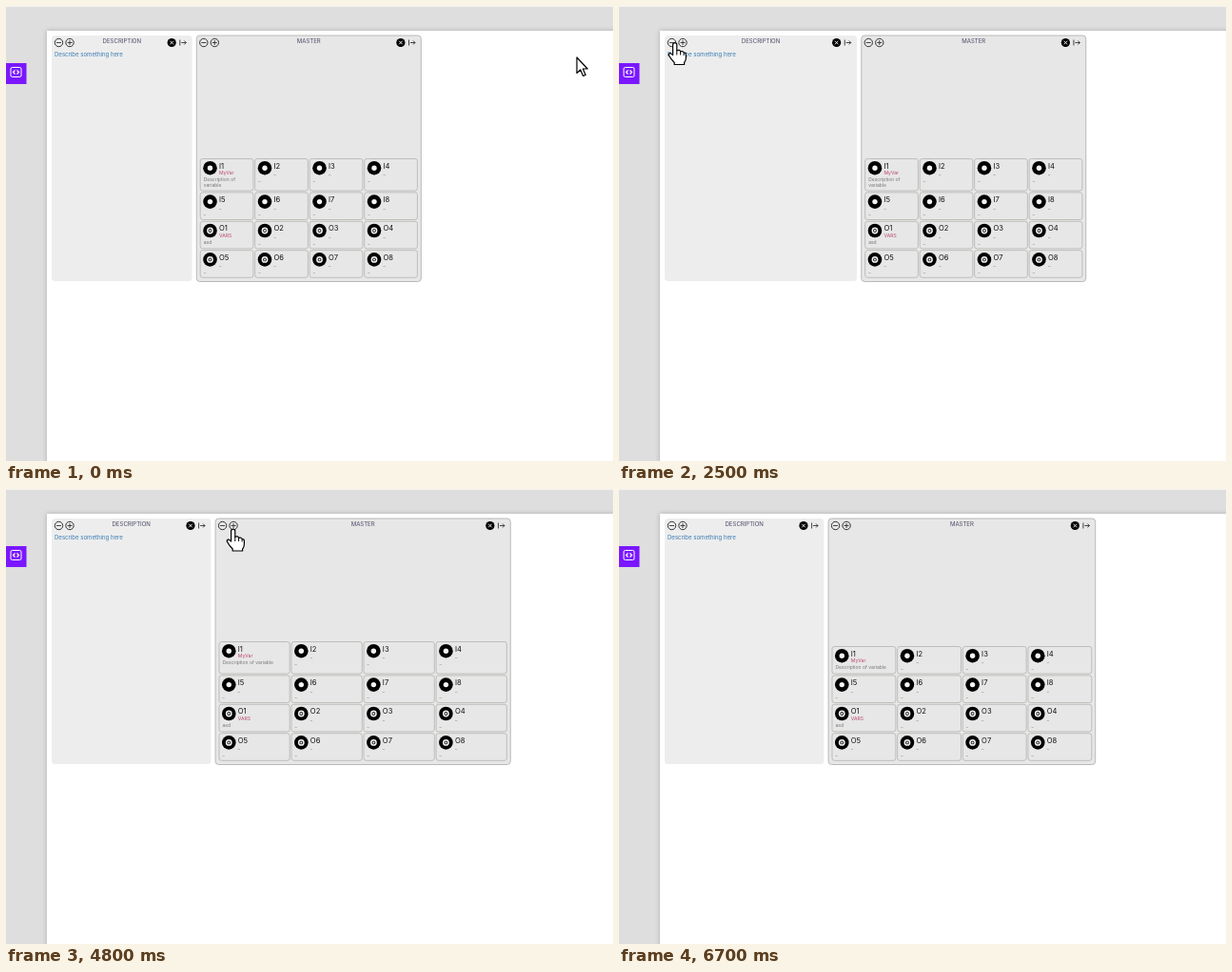
An HTML page with a canvas for the animation above (7.9 s loop, 638 by 478 pixels).

```html
<!DOCTYPE html>
<html lang="en">
<head>
<meta charset="utf-8">
<title>Resizable panels</title>
<style>
html, body { margin: 0; width: 100%; height: 100%; overflow: hidden; background: #dedede; }
canvas { display: block; }
</style>
</head>
<body>
<canvas width="638" height="478"></canvas>
<script>
const g = document.querySelector('canvas').getContext('2d');
const LOOP = 7900, STEP = 100, SPEED = .0738, ROW = 30.4;
const grey = '#777';

// Pointer trips: start, end, x, y, sideways bow
const trips = [
  [0, 800, 69, 37.5, 40],
  [1950, 2300, 59, 38.5, 0],
  [2950, 3300, 242.5, 31, -16],
  [3300, 3700, 239, 42, -11],
  [5000, 5300, 225.5, 38.5, 0]
];
const arrow = new Path2D('M0 0V16.5L3.8 13 6.6 19.5 9.2 18.4 6.4 12H11.2Z');
const hand = new Path2D('M-2.4 13V2.2a2.1 2.1 0 0 1 4.2 0V8.2q3.2-1.2 3.8 1.2 3-1 3.5 1.3 2.3-.5 2.3 2V16q0 3-1.8 5v2H-.8V21q-3.6-3.6-6-8 .2-2.8 2.4-1.6Z');

// Time passed between a and b
const span = (t, a, b) => Math.min(Math.max(t, a), b) - a;

function pointerAt(t) {
  let x = 600, y = 54;
  for (const [a, b, tx, ty, bow] of trips) {
    const p = span(t, a, b) / (b - a), e = p * p * (3 - 2 * p);
    x += (tx - x) * e;
    y += (ty - y) * e + bow * Math.sin(Math.PI * e);
  }
  return [x, y];
}

function text(s, x, y, size, color, align = 'left') {
  g.font = size + 'px Inter, sans-serif';
  g.textAlign = align;
  g.fillStyle = color;
  g.fillText(s, x, y);
}

function box(x, y, w, h, r, fill, stroke) {
  g.beginPath();
  g.roundRect(x, y, w, h, r);
  if (fill) { g.fillStyle = fill; g.fill(); }
  if (stroke) { g.strokeStyle = stroke; g.lineWidth = 1; g.stroke(); }
}

function disc(x, y, r, color) {
  g.beginPath();
  g.arc(x, y, r, 0, 7);
  g.fillStyle = color;
  g.fill();
}

function line(d, x, y, color, width) {
  g.save();
  g.translate(x, y);
  g.strokeStyle = color;
  g.lineWidth = width;
  g.stroke(new Path2D(d));
  g.restore();
}

function backdrop() {
  g.fillStyle = '#dedede';
  g.fillRect(0, 0, 638, 478);
  g.fillStyle = '#f2f2f2';
  g.fillRect(0, 0, 638, 1);
  g.save();
  g.shadowColor = 'rgba(0,0,0,.22)';
  g.shadowBlur = 5;
  g.fillStyle = '#fff';
  g.fillRect(43, 26, 640, 500);
  g.restore();
  g.fillStyle = '#7a17ff';
  g.fillRect(0, 60, 21.5, 22);
  box(5, 64.5, 11, 10, 1.5, null, '#fff');
  line('M-1-2L-3 0-1 2M1-2L3 0 1 2', 10.5, 69.5, '#fff', 1.2);
}

function header(title, x, w) {
  const y = 38.5, right = x + w, minus = 'M-2.5 0H2.5';
  [minus, minus + 'M0-2.5V2.5'].forEach((sign, i) => {
    box(x + 3.3 + i * 11.5, y - 4.2, 8.4, 8.4, 4.2, null, '#333');
    line(sign, x + 7.5 + i * 11.5, y, '#333', .9);
  });
  text(title, x + w / 2, 39.4, 6.05, '#4a4a68', 'center');
  disc(right - 21.4, y, 4.6, '#000');
  line('M-1.8-1.8L1.8 1.8M1.8-1.8L-1.8 1.8', right - 21.4, y, '#fff', .9);
  line('M-3-3V3M-1.5 0H3.5M1.5-2L3.5 0 1.5 2', right - 9.8, y, '#333', .9);
}

function cell(kind, n, x, y, w, h) {
  box(x, y, w, h, 2.5, null, '#bdbdba');
  const cx = x + 10.3, cy = y + 9.7, named = n === 1;
  disc(cx, cy, 7.3, '#000');
  disc(cx, cy, kind === 'I' ? 2.7 : 3.4, '#f4f4f4');
  if (kind === 'O') {
    disc(cx, cy, 1.9, '#222');
    disc(cx, cy, 1, '#f4f4f4');
  }
  text(kind + n, x + 19.8, y + 10, 7.6, '#111');
  const name = !named ? '_' : kind === 'I' ? 'MyVar' : 'VARS';
  text(name, x + 19.8, y + 16.7, 5.1, named ? '#b8466f' : grey);
  let note = ['_'];
  if (named) note = kind === 'O' ? ['asd'] :
    w > 62 ? ['Description of variable'] : ['Description of', 'variable'];
  note.forEach((s, i) => text(s, x + 3.5, y + 23.5 + i * 6, 5, grey));
}

function master(x, w, extra) {
  box(x, 31, w, 258.5, 3.5, '#e7e7e7', '#b9b9b9');
  header('MASTER', x, w);
  const pitch = (w - 6) / 4;
  for (let i = 0; i < 16; i++) {
    const row = i >> 2, tall = row ? 0 : extra;
    cell(row < 2 ? 'I' : 'O', i % 8 + 1, x + 3.9 + i % 4 * pitch,
      165.5 + row * ROW - tall, pitch - 1.8, ROW - 1.8 + tall);
  }
}

function cursor(t) {
  if (t >= 6700) return;
  const shape = t < 800 || t >= 3000 && t < 3600 ? arrow : hand;
  g.save();
  g.translate(...pointerAt(t));
  g.fillStyle = '#fff';
  g.fill(shape);
  g.strokeStyle = '#000';
  g.lineWidth = 1.2;
  g.lineJoin = 'round';
  g.stroke(shape);
  if (shape === hand) line('M1.8 8V13M5.6 9.5V13M9.1 11V13.5', 0, 0, '#000', 1);
  g.restore();
}

function draw(now) {
  const t = Math.floor(now % LOOP / STEP) * STEP;
  const d = SPEED * (span(t, 1192, 1955) - span(t, 2475, 2970));
  const m = SPEED * (span(t, 3795, 5010) - span(t, 5400, 6010));
  backdrop();
  box(48, 31, 147.6 + d, 258, 3.5, '#ededed');
  header('DESCRIPTION', 48, 147.6 + d);
  text('Describe something here', 51, 53, 6.05, '#3a7cb4');
  master(200.3 + d, 236 + m, t < 5200 ? 5 : 0);
  cursor(t);
}

let start;
function tick(now) {
  start ??= now;
  draw(now - start);
  requestAnimationFrame(tick);
}
requestAnimationFrame(tick);
</script>
</body>
</html>
```
